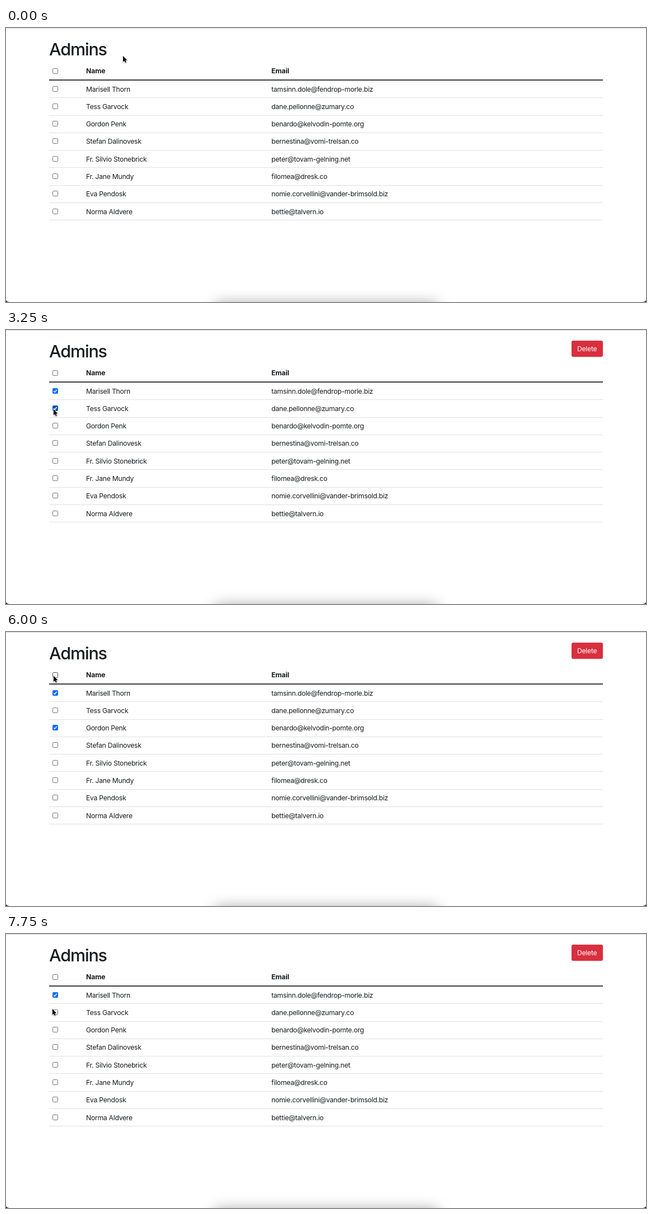
An HTML page with a canvas that plays this animation: 1143x490 px, repeating every 8 s.

```html
<!DOCTYPE html>
<html lang="en">
<head>
<meta charset="utf-8">
<title>Admins</title>
<style>
  html, body { margin: 0; width: 100%; height: 100%; overflow: hidden; background: #fff; }
  canvas { display: block; }
</style>
</head>
<body>
<canvas id="stage" width="1143" height="490"></canvas>
<script>
const ctx = document.getElementById('stage').getContext('2d');
const LOOP = 8000, STEP = 250;
const LEFT = 77, WIDTH = 989, NAME_X = 143, EMAIL_X = 474;
const FIRST_ROW = 109, PITCH = 31.31;
const INK = '#191c1f';

const admins = [
  ['Marisell Thorn', 'tamsinn.dole@fendrop-morle.biz'],
  ['Tess Garvock', 'dane.pellonne@zumary.co'],
  ['Gordon Penk', 'benardo@kelvodin-pomte.org'],
  ['Stefan Dalinovesk', 'bernestina@vomi-trelsan.co'],
  ['Fr. Silvio Stonebrick', 'peter@tovam-gelning.net'],
  ['Fr. Jane Mundy', 'filomea@dresk.co'],
  ['Eva Pendosk', 'nomie.corvellini@vander-brimsold.biz'],
  ['Norma Aldvere', 'bettie@talvern.io']
];

// Box 0 is the one in the header
const boxes = [...admins.keys(), admins.length];
const boxY = i => i ? FIRST_ROW + PITCH * (i - 1) : 77;

// The pointer stops at a box, clicks, and moves on one step after the last click
const stop = (box, arrive, ...clicks) => ({
  box, arrive, clicks, leave: Math.max(arrive, ...clicks) + STEP, x: 85, y: boxY(box) + 1.5
});
const start = { x: 209, y: 50, leave: 0 };
const stops = [
  stop(1, 1250, 2000), stop(2, 2750, 3000), stop(3, 3750, 3750), stop(2, 4500, 5000),
  stop(0, 5500, 6250, 6750), stop(1, 7250, 7250), stop(2, LOOP)
];

const easeOut = p => 1 - (1 - p) ** 2;

function pointerAt(t) {
  const index = stops.findIndex(s => t <= s.leave);
  const to = stops[index], from = stops[index - 1] || start;
  const p = easeOut(Math.min(1, (t - from.leave) / (to.arrive - from.leave)));
  return {
    x: from.x + (to.x - from.x) * p - 3 * Math.sin(Math.PI * p),
    y: from.y + (to.y - from.y) * p,
    hovered: t > to.arrive ? to.box : -1
  };
}

function tickedAt(t) {
  let ticked = new Set();
  for (const { box, clicks } of stops) {
    for (const click of clicks) {
      if (click > t) continue;
      const on = !ticked.has(box);
      if (box === 0) ticked = new Set(on ? boxes : []);
      else if (on) ticked.add(box);
      else ticked.delete(box);
    }
  }
  return ticked;
}

function text(str, x, y, { size = 12.2, weight = 400, color = INK, spacing = -0.27 } = {}) {
  ctx.font = `${weight} ${size}px Inter, sans-serif`;
  ctx.letterSpacing = spacing + 'px';
  ctx.fillStyle = color;
  ctx.fillText(str, x, y);
}

function rect(x, y, w, h, color) {
  ctx.fillStyle = color;
  ctx.fillRect(x, y, w, h);
}

function roundBox(x, y, w, h, r) {
  ctx.beginPath();
  ctx.roundRect(x, y, w, h, r);
}

function checkbox(i, checked, hovered) {
  const y = Math.floor(boxY(i));
  if (!checked) {
    roundBox(83.5, y - 4.5, 9, 9, 1.8);
    ctx.lineWidth = 1;
    ctx.strokeStyle = hovered ? '#484848' : '#727272';
    ctx.stroke();
    return;
  }
  roundBox(83, y - 5, 10, 10, 1.9);
  ctx.fillStyle = hovered ? '#0055bd' : '#0a6eff';
  ctx.fill();
  ctx.beginPath();
  ctx.moveTo(85.2, y + 0.2);
  ctx.lineTo(87.2, y + 2.2);
  ctx.lineTo(90.8, y - 2.4);
  ctx.lineWidth = 1.5;
  ctx.strokeStyle = '#fff';
  ctx.stroke();
}

function corner(x, side, color) {
  ctx.beginPath();
  ctx.moveTo(x, 486.5);
  ctx.quadraticCurveTo(x + side, 489.3, x + side * 6, 490);
  ctx.lineTo(x, 490);
  ctx.fillStyle = color;
  ctx.fill();
}

function backdrop() {
  rect(0, 0, 1143, 490, '#fff');
  rect(0, 0, 1143, 1, '#d6d6d6');
  ctx.save();
  ctx.shadowColor = 'rgba(0,0,0,0.38)';
  ctx.shadowBlur = 26;
  roundBox(372, 493, 400, 60, 8);
  ctx.fillStyle = '#fff';
  ctx.fill();
  ctx.restore();
  corner(0, 1, '#222');
  corner(1143, -1, '#4a2430');
}

function table() {
  text('Admins', LEFT, 49, { size: 30.5, weight: 500, spacing: -1.15 });
  const head = { weight: 700, spacing: -0.1 };
  text('Name', NAME_X, 81.3, head);
  text('Email', EMAIL_X, 81.3, head);
  rect(LEFT, 92.2, WIDTH, 1.7, INK);
  admins.forEach(([name, email], i) => {
    const y = boxY(i + 1);
    text(name, NAME_X, y + 4.5);
    text(email, EMAIL_X, y + 4.5);
    rect(LEFT, Math.round(y + 15.2), WIDTH, 1, '#dee0e2');
  });
}

function deleteButton() {
  roundBox(1010, 19, 56, 29, 3);
  ctx.fillStyle = '#d92f3e';
  ctx.fill();
  text('Delete', 1020, 38.2, { color: '#fff' });
}

function arrow({ x, y }) {
  const outline = [[0, 0], [0, 10.6], [2.4, 8.4], [4, 12.1], [5.8, 11.3], [4.2, 7.8], [7.4, 7.6]];
  ctx.save();
  ctx.translate(x, y);
  ctx.beginPath();
  outline.forEach(p => ctx.lineTo(...p));
  ctx.closePath();
  ctx.lineJoin = 'round';
  ctx.lineWidth = 1.5;
  ctx.strokeStyle = '#fff';
  ctx.shadowColor = 'rgba(0,0,0,0.35)';
  ctx.shadowBlur = 2;
  ctx.shadowOffsetY = 0.8;
  ctx.stroke();
  ctx.shadowColor = 'transparent';
  ctx.fillStyle = '#000';
  ctx.fill();
  ctx.restore();
}

function draw(now) {
  const t = Math.floor((now % LOOP) / STEP) * STEP;
  const pointer = pointerAt(t), ticked = tickedAt(t);

  backdrop();
  table();
  if (ticked.size) deleteButton();
  boxes.forEach(i => checkbox(i, ticked.has(i), pointer.hovered === i));
  arrow(pointer);
}

const began = performance.now();
function tick() {
  draw(performance.now() - began);
  requestAnimationFrame(tick);
}
tick();
</script>
</body>
</html>
```
